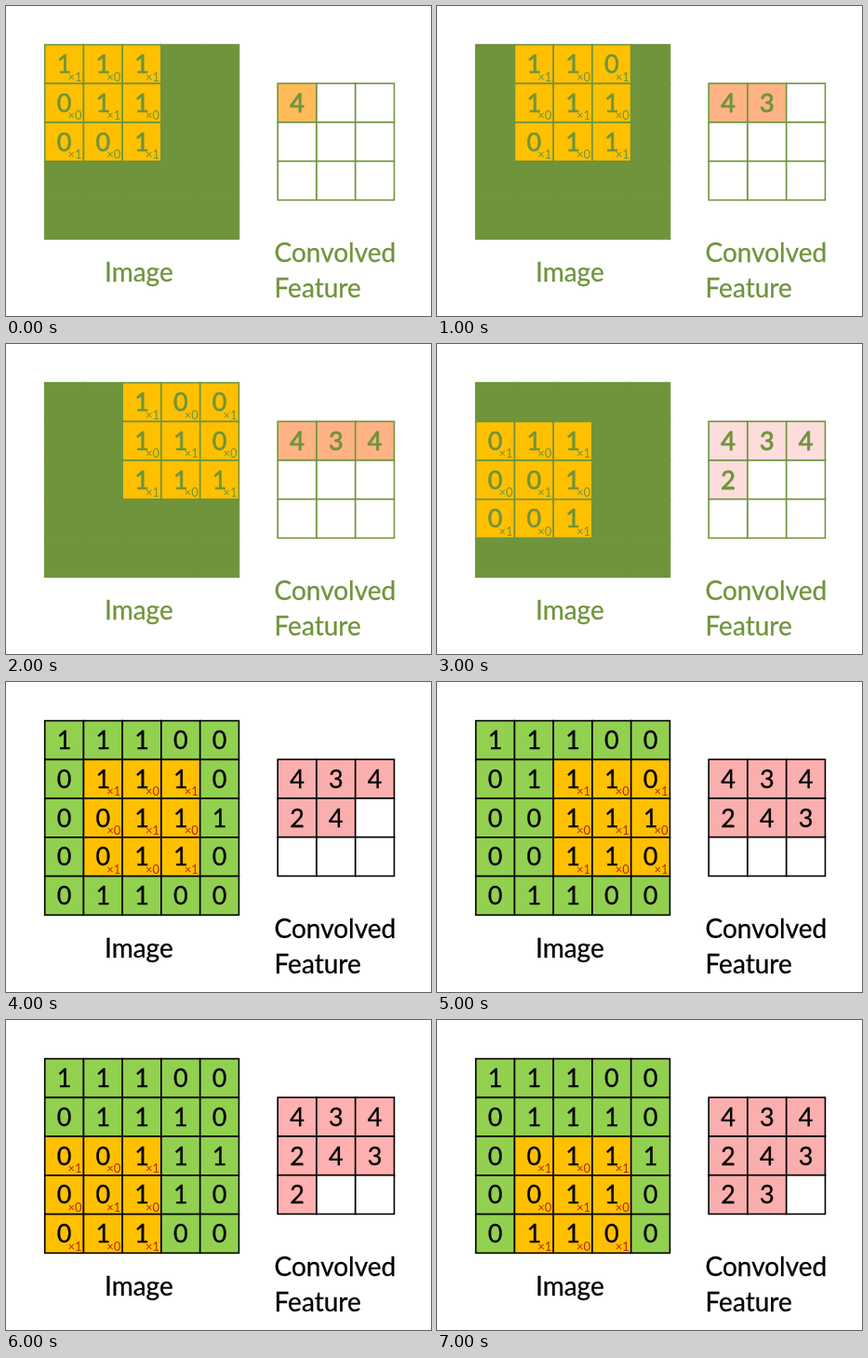
Write an HTML page that moves like this. It is 457 px wide and 333 px high and loops after 8 s.

```html
<!DOCTYPE html>
<html lang="en">
<head>
<meta charset="utf-8">
<title>Convolution</title>
<style>
  html, body { margin: 0; width: 100%; height: 100%; overflow: hidden; background: #fff; }
  svg { display: block; }
  text { font-family: Lato, "Open Sans", sans-serif; }
</style>
</head>
<body>
<svg id="stage" width="457" height="333" viewBox="0 0 457 333"></svg>
<script>
const NS = "http://www.w3.org/2000/svg";
const stage = document.getElementById("stage");
const CELL = 41.75, STEP_MS = 1000, STEPS = 8;
const IMAGE = ["11100", "01110", "00111", "00110", "01100"];
const KERNEL = ["101", "010", "101"];
const OLIVE = "#70943c", LEAF = "#92d050", AMBER = "#ffc000";
const RESULT_FILLS = ["#ffbb59", "#ffb384", "#ffb384", "#fddcdc",
                      "#fbaeae", "#fbaeae", "#ffb0b0", "#fbaeae"];

function add(tag, attrs, content = "") {
  const el = document.createElementNS(NS, tag);
  set(el, attrs);
  el.textContent = content;
  stage.appendChild(el);
  return el;
}

function set(el, attrs) {
  for (const key in attrs) el.setAttribute(key, attrs[key]);
}

function makeGrid(left, top, size) {
  const cells = [];
  for (let row = 0; row < size; row++) {
    for (let col = 0; col < size; col++) {
      const x = left + col * CELL, y = top + row * CELL;
      const box = add("rect", { x, y, width: CELL, height: CELL, "stroke-width": 1.6 });
      cells.push({ row, col, x, y, box });
    }
  }
  for (const cell of cells) {
    cell.digit = add("text", {
      x: cell.x + CELL / 2, y: cell.y + 30.6,
      "font-size": 27, "text-anchor": "middle"
    });
    cell.factor = add("text", {
      x: cell.x + CELL - 1.8, y: cell.y + CELL - 2.8,
      "font-size": 13, "text-anchor": "end"
    });
  }
  return cells;
}

const image = makeGrid(41.7, 41.6, 5);
const result = makeGrid(292.2, 83.2, 3);
const labels = [["Image", 106, 296], ["Convolved", 288.5, 275], ["Feature", 288.5, 313]]
  .map(([word, x, y]) => add("text", { x, y, "font-size": 28, "stroke-width": 0.3 }, word));

// Sum of the image under the kernel placed at one result cell
function convolve(row, col) {
  let sum = 0;
  for (let r = 0; r < 3; r++)
    for (let c = 0; c < 3; c++) sum += IMAGE[row + r][col + c] * KERNEL[r][c];
  return sum;
}

function draw(step) {
  const muted = step < 4;
  const ink = muted ? OLIVE : "#000";
  const top = Math.floor(step / 3), left = step % 3;

  for (const { row, col, box, digit, factor } of image) {
    const weight = KERNEL[row - top]?.[col - left];
    const active = weight !== undefined;
    set(box, { fill: active ? AMBER : muted ? OLIVE : LEAF, stroke: ink });
    set(digit, { fill: ink, stroke: ink, "stroke-width": muted ? 0.6 : 0.3 });
    set(factor, { fill: muted ? OLIVE : "#b02c00" });
    digit.textContent = active || !muted ? IMAGE[row][col] : "";
    factor.textContent = active ? "×" + weight : "";
  }

  result.forEach(({ row, col, box, digit }, i) => {
    const done = i <= step;
    set(box, { fill: done ? RESULT_FILLS[step] : "#fff", stroke: ink });
    set(digit, { fill: ink, stroke: ink, "stroke-width": muted ? 0.9 : 0.3 });
    digit.textContent = done ? convolve(row, col) : "";
  });

  labels.forEach(label => set(label, { fill: ink, stroke: ink }));
}

let shown = -1;
function tick() {
  const step = Math.floor(performance.now() / STEP_MS) % STEPS;
  if (step !== shown) draw(shown = step);
  requestAnimationFrame(tick);
}
tick();
</script>
</body>
</html>
```
